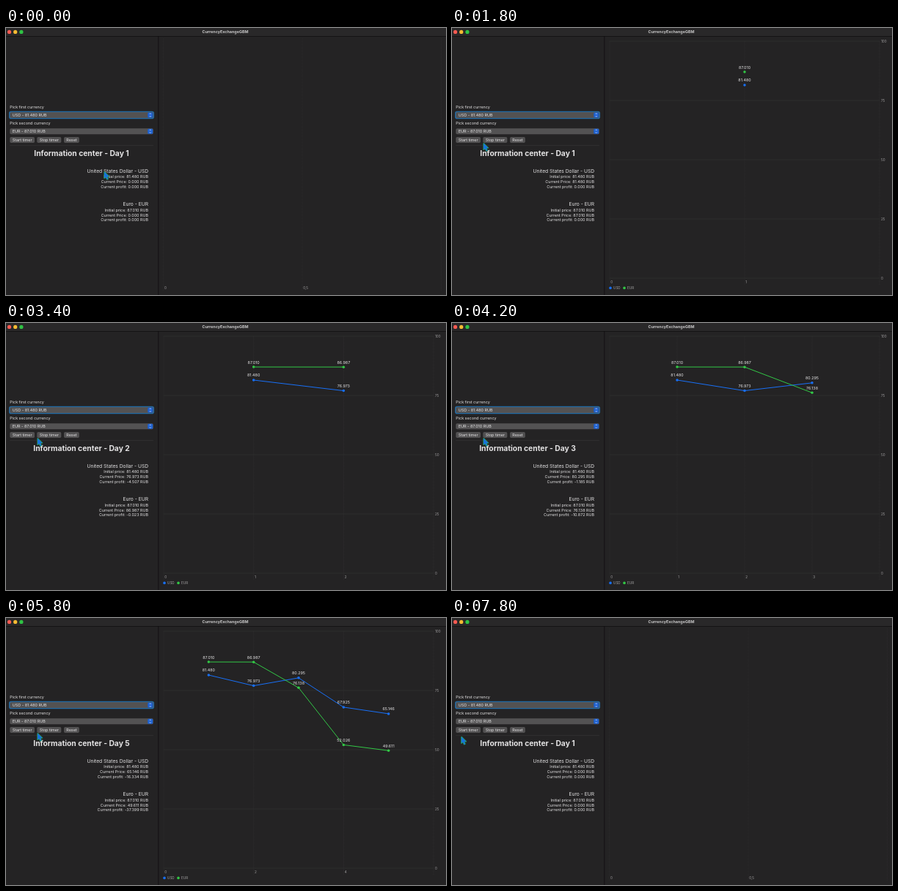
Recreate the animation shown at these times as an HTML page with a canvas. Size 600 by 365 pixels, loop 8000 ms.

```html
<!DOCTYPE html>
<html lang="en">
<head>
<meta charset="utf-8">
<title>CurrencyExchangeGBM</title>
<style>
html, body { margin: 0; width: 100%; height: 100%; overflow: hidden; background: #242324; }
canvas { display: block; width: 600px; height: 365px; }
</style>
</head>
<body>
<canvas id="stage"></canvas>
<script>
const W = 600, H = 365, LOOP = 8000, STEP = 200;
const canvas = document.getElementById('stage');
const ctx = canvas.getContext('2d');
const ratio = window.devicePixelRatio || 1;
canvas.width = W * ratio;
canvas.height = H * ratio;

const BLUE = '#1870f8', GREEN = '#32c846', WHITE = '#e4e3e4', GREY = '#a3a2a3';
const BODY = 5.4, SMALL = 4.6;
const series = [
  { code: 'USD', name: 'United States Dollar', color: BLUE, top: 195.5, legend: 216,
    prices: [81.480, 76.973, 80.295, 67.925, 65.146] },
  { code: 'EUR', name: 'Euro', color: GREEN, top: 241, legend: 235,
    prices: [87.010, 86.987, 76.138, 52.026, 49.611] }
];
const plot = { left: 215, right: 583, top: 18, bottom: 342 };

// Start time and number of plotted days.
const days = [[0, 0], [1800, 1], [2800, 2], [3800, 3], [4800, 4], [5800, 5], [7000, 0]];
// Pointer tip: time, x, y.
const pointer = [
  [0, 134, 196.5], [1000, 30.8, 154.5], [1300, 31.5, 155], [1800, 43, 157.5],
  [5800, 43, 157.5], [6700, 93, 153], [7000, 93, 153], [7800, 12.8, 162.3], [8000, 12.8, 162.3]
];

function text(str, x, y, size = BODY, color = WHITE, align = 'left', weight = 400) {
  ctx.font = `${weight} ${size}px Inter, "Open Sans", sans-serif`;
  ctx.textAlign = align;
  ctx.fillStyle = color;
  ctx.fillText(str, x, y + size * 0.36);
}

function box(x, y, w, h, r, color) {
  ctx.fillStyle = color;
  ctx.beginPath();
  ctx.roundRect(x, y, w, h, r);
  ctx.fill();
}

function dot(x, y, r, color) {
  ctx.fillStyle = color;
  ctx.beginPath();
  ctx.arc(x, y, r, 0, Math.PI * 2);
  ctx.fill();
}

function path(points, color, width, dash = []) {
  ctx.strokeStyle = color;
  ctx.lineWidth = width;
  ctx.lineJoin = 'round';
  ctx.setLineDash(dash);
  ctx.beginPath();
  points.forEach(([x, y]) => ctx.lineTo(x, y));
  ctx.stroke();
  ctx.setLineDash([]);
}

function drawWindow() {
  ctx.fillStyle = '#242324';
  ctx.fillRect(0, 0, W, H);
  ctx.fillStyle = '#292829';
  ctx.fillRect(0, 0, W, 11);
  ctx.fillStyle = '#111011';
  ctx.fillRect(0, 11, W, 0.8);
  ctx.fillRect(207.4, 11, 0.9, H - 11);
  ['#fb5a52', '#f6ba32', '#2fc244'].forEach((c, i) => dot(4.5 + i * 8.2, 5.4, 2.6, c));
  text('CurrencyExchangeGBM', 299, 5.3, BODY, '#c9c8c9', 'center', 700);
}

function drawPicker(label, item, y, focused) {
  text(label, 5.3, y - 11.4);
  if (focused) box(4, y - 5.2, 198, 10.4, 2.8, '#236ca6');
  box(5.3, y - 4, 195.5, 8, 1.8, '#535253');
  text(item, 8.8, y);
  box(193.2, y - 3.5, 7, 7, 1.5, '#1b5fd0');
  for (const s of [-1, 1]) {
    path([[195.4, y + s], [196.7, y + s * 2.3], [198, y + s]], '#e8eefc', 0.7);
  }
}

function drawButton(label, x, w) {
  box(x, 148.9, w, 8.2, 1.8, '#525152');
  text(label, x + w / 2, 152.9, BODY, WHITE, 'center');
}

function drawPanel(count) {
  drawPicker('Pick first currency', 'USD - 81.480 RUB', 119, true);
  drawPicker('Pick second currency', 'EUR - 87.010 RUB', 141.2, false);
  drawButton('Start timer', 5.3, 33.7);
  drawButton('Stop timer', 42.3, 33);
  drawButton('Reset', 79, 20.8);
  path([[5, 160.6], [201, 160.6]], '#383738', 0.6);
  text(`Information center - Day ${count || 1}`, 103, 171.6, 10.3, WHITE, 'center', 700);

  for (const { code, name, prices, top } of series) {
    const first = prices[0];
    const now = count ? prices[count - 1] : 0;
    const profit = count ? now - first : 0;
    text(`${name} - ${code}`, 194, top, 6.7, WHITE, 'right');
    [
      `Initial price: ${first.toFixed(3)} RUB`,
      `Current Price: ${now.toFixed(3)} RUB`,
      `Current profit: ${profit.toFixed(3)} RUB`
    ].forEach((line, i) => text(line, 194, top + 8 + i * 6.6, BODY, WHITE, 'right'));
  }
}

function drawEmptyChart() {
  for (const x of [214.7, 404, 593.3]) {
    path([[x, 14], [x, 359]], '#302f30', 0.7, [1.2, 0.8]);
  }
  text('0', 216, 355.3, SMALL, GREY);
  text('0,5', 405.3, 355.3, SMALL, GREY);
}

function drawChart(count) {
  const { left, right, top, bottom } = plot;
  const gap = (right - left) / (count + 1);
  const toX = day => left + day * gap;
  const toY = price => bottom - price * (bottom - top) / 100;

  for (let v = 0; v <= 100; v += 25) {
    path([[left, toY(v)], [right, toY(v)]], '#333233', 0.7);
    text(String(v), right + 2, toY(v), SMALL, GREY);
  }
  const every = count > 3 ? 2 : 1;
  for (let d = 0; d <= count + 1; d += every) {
    path([[toX(d), top], [toX(d), 351]], '#333233', 0.7, [1.2, 0.8]);
    if (d <= count) text(String(d), toX(d) + 1.3, 347.3, SMALL, GREY);
  }
  if (every === 2 && count % 2 === 0) {
    path([[right, top], [right, bottom]], '#2c2b2c', 0.7, [1.2, 0.8]);
  }

  const curves = series.map(s => ({
    ...s,
    points: s.prices.slice(0, count).map((p, i) => [toX(i + 1), toY(p)])
  }));
  for (const { points, color } of curves) path(points, color, 1);
  for (const { points, color, prices } of curves) {
    points.forEach(([x, y], i) => {
      dot(x, y, 1.75, color);
      text(prices[i].toFixed(3), x, y - 6.5, BODY, WHITE, 'center');
    });
  }
  for (const { code, color, legend } of series) {
    dot(legend, 355.4, 1.8, color);
    text(code, legend + 4, 355.4, SMALL, GREY);
  }
}

function pointerAt(t) {
  const i = pointer.findIndex((k, n) => n > 0 && t <= k[0]);
  const [t0, x0, y0] = pointer[i - 1];
  const [t1, x1, y1] = pointer[i];
  const u = (t - t0) / (t1 - t0);
  const e = u * u * (3 - 2 * u);
  return [x0 + (x1 - x0) * e, y0 + (y1 - y0) * e];
}

function drawPointer([x, y]) {
  const shape = [[0, 0], [0, 9], [2.1, 7.3], [3.7, 10.6], [5.3, 9.9], [3.9, 6.7], [6.6, 6.5], [0, 0]];
  ctx.save();
  ctx.translate(x, y);
  path(shape, '#25a958', 1.2);
  ctx.fillStyle = '#1872dc';
  ctx.fill();
  ctx.restore();
}

function frame(now) {
  const t = Math.floor((now % LOOP) / STEP) * STEP;
  const count = days.filter(d => d[0] <= t).pop()[1];
  ctx.setTransform(ratio, 0, 0, ratio, 0, 0);
  drawWindow();
  drawPanel(count);
  if (count) drawChart(count);
  else drawEmptyChart();
  drawPointer(pointerAt(t));
}

let start;
function tick(now) {
  start ??= now;
  frame(now - start);
  requestAnimationFrame(tick);
}
frame(0);
requestAnimationFrame(tick);
</script>
</body>
</html>
```
